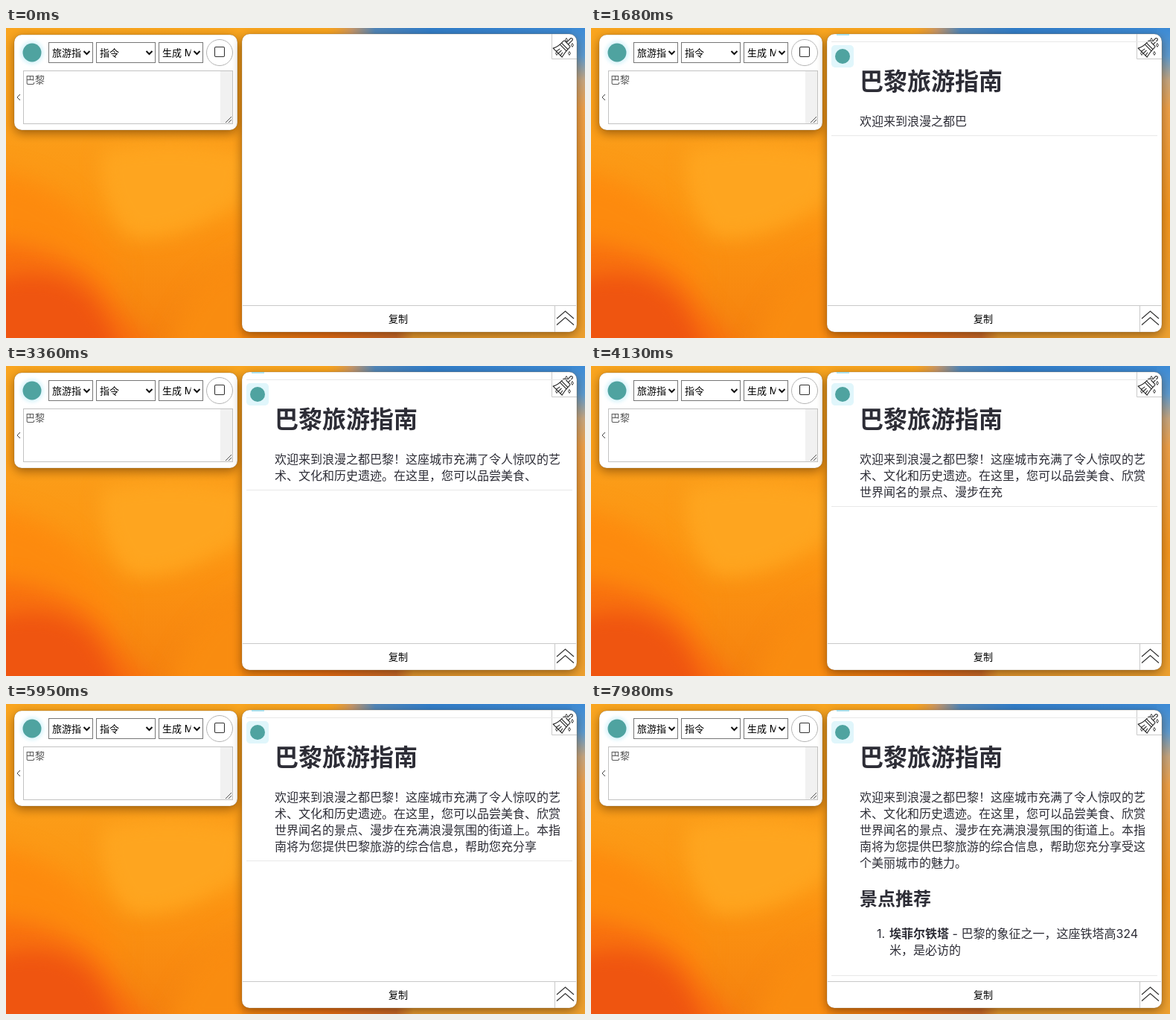
An HTML page with a canvas for the animation above (8 s loop, 778 by 416 pixels).

```html
<!DOCTYPE html>
<html lang="zh-CN">
<head>
<meta charset="utf-8">
<title>旅游指南</title>
<style>
  html, body { margin: 0; width: 778px; height: 416px; overflow: hidden; }
  canvas, svg { position: absolute; left: 0; top: 0; display: block; }
  text { font-family: Inter, "Noto Sans CJK SC", "Noto Sans CJK", sans-serif; font-size: 16px; fill: #2d2d36; white-space: pre; }
  .ui { font-size: 13px; fill: #000; }
  .h1 { font-size: 32px; font-weight: 700; }
  .h2 { font-size: 24px; font-weight: 700; }
  .b { font-weight: 700; }
</style>
</head>
<body>
<canvas id="stage" width="778" height="416"></canvas>
<svg width="778" height="416" viewBox="0 0 778 416">
  <defs>
    <clipPath id="c1"><rect x="58" y="20" width="43" height="26"/></clipPath>
    <clipPath id="c2"><rect x="206" y="20" width="42.5" height="26"/></clipPath>
  </defs>
  <text class="ui" x="62" y="38" clip-path="url(#c1)">旅游指令</text>
  <text class="ui" x="126" y="38">指令</text>
  <text class="ui" x="210" y="38" clip-path="url(#c2)">生成 MD</text>
  <text class="ui" x="26" y="74" style="fill:#555">巴黎</text>
  <text class="ui" x="514" y="395">复制</text>
  <g id="reply">
    <rect x="330" y="8" width="17" height="2" fill="#a9e0ee"/>
    <rect x="323" y="18" width="438" height="1" fill="#e8e8e8"/>
    <rect x="323" y="23" width="30" height="30" rx="5" fill="#e0f6fb"/>
    <circle cx="338" cy="38" r="10" fill="#4fa3a0"/>
    <rect id="rule" x="323" width="438" height="1" fill="#e8e8e8"/>
    <text id="title" class="h1" x="361" y="83"></text>
    <g id="para"></g>
    <text id="sub" class="h2" x="361" y="270"></text>
    <text id="mark" x="384" y="314"></text>
    <text x="401" y="314"><tspan id="name" class="b"></tspan><tspan id="item1"></tspan></text>
    <text id="item2" x="401" y="336"></text>
  </g>
</svg>
<script>
const $ = id => document.getElementById(id);
const ctx = $('stage').getContext('2d');

// ---- static scene ----
function linear(x0, y0, x1, y1, stops) {
  const g = ctx.createLinearGradient(x0, y0, x1, y1);
  stops.forEach(([p, c]) => g.addColorStop(p, c));
  return g;
}

function softShape(d, color, blur) {
  ctx.save();
  ctx.filter = `blur(${blur}px)`;
  ctx.fillStyle = color;
  ctx.fill(new Path2D(d));
  ctx.restore();
}

function stroke(d, color = '#333', width = 1) {
  ctx.strokeStyle = color;
  ctx.lineWidth = width;
  ctx.stroke(new Path2D(d));
}

function box(x, y, w, h, color, fill) {
  if (fill) { ctx.fillStyle = fill; ctx.fillRect(x, y, w, h); }
  ctx.strokeStyle = color;
  ctx.lineWidth = 1;
  ctx.strokeRect(x + .5, y + .5, w - 1, h - 1);
}

function disc(x, y, r, color) {
  ctx.fillStyle = color;
  ctx.beginPath();
  ctx.arc(x, y, r, 0, 7);
  ctx.fill();
}

function panel(x, y, w, h) {
  ctx.save();
  ctx.shadowColor = 'rgba(60,30,0,.5)';
  ctx.shadowBlur = 14;
  ctx.shadowOffsetY = 4;
  ctx.fillStyle = '#fff';
  ctx.beginPath();
  ctx.roundRect(x, y, w, h, 10);
  ctx.fill();
  ctx.shadowColor = 'transparent';
  ctx.strokeStyle = 'rgba(90,60,20,.35)';
  ctx.lineWidth = .6;
  ctx.stroke();
  ctx.restore();
}

function wallpaper() {
  ctx.fillStyle = linear(0, 0, 0, 416, [[0, '#f9a51f'], [.35, '#fb9c18'], [.6, '#fd9612'], [1, '#f5820f']]);
  ctx.fillRect(0, 0, 778, 416);
  softShape('M-30 190C50 200 110 240 150 320L130 450H-30Z', '#fd8a0e', 16);
  softShape('M-30 285C30 290 90 300 135 350C160 390 190 420 220 450H-30Z', '#f8700f', 14);
  softShape('M-30 345C30 320 90 330 120 370C140 400 150 420 160 450H-30Z', '#ef5510', 13);
  softShape('M128 165C190 150 260 150 330 170L315 235C270 260 220 290 165 280C135 250 125 210 128 165Z', '#fea51f', 12);
  softShape('M215 440C235 370 270 320 330 300V440Z', '#f98c10', 14);
  ctx.fillStyle = linear(430, 0, 778, 0, [[0, 'rgba(240,155,50,0)'], [.1, '#c3966b'], [.19, '#4f86ba'], [.4, '#2f7dcb'], [1, '#3b8ad6']]);
  ctx.fillRect(430, 0, 348, 14);
  ctx.fillStyle = linear(0, 0, 0, 416, [[0, '#3b8ad6'], [.09, '#5b9bd2'], [.17, '#c7a781'], [.26, '#eda04a'], [.6, '#f2951f'], [1, '#eda02f']]);
  ctx.fillRect(760, 0, 18, 416);
  ctx.fillStyle = linear(317, 0, 778, 0, [[0, '#f5870f'], [.25, '#ec6e14'], [.45, '#c9682a'], [.5, '#e59a30'], [1, '#eda02f']]);
  ctx.fillRect(317, 402, 461, 14);
}

function inputPanel() {
  panel(11, 9, 300, 128);
  ctx.save();
  ctx.filter = 'blur(2px)';
  disc(35, 33, 16, '#def5fb');
  ctx.restore();
  disc(35, 33, 12.5, '#4fa3a0');
  [[57, 60], [121, 80], [205, 60]].forEach(([x, w]) => {
    box(x, 19, w, 28, '#767676', '#fff');
    const m = x + w - 8.5;
    stroke(`M${m - 4} 31l4 4l4 -4`, '#111', 2);
  });
  ctx.strokeStyle = '#b5b5b5';
  ctx.lineWidth = 1;
  ctx.beginPath();
  ctx.arc(287, 33, 17.5, 0, 7);
  ctx.stroke();
  ctx.strokeStyle = '#333';
  ctx.lineWidth = 1.1;
  ctx.beginPath();
  ctx.roundRect(280.5, 25.5, 13, 13, 1.5);
  ctx.stroke();
  box(23, 57, 282, 72, '#c3c3c3', '#fff');
  ctx.fillStyle = '#f1f1f1';
  ctx.fillRect(288, 58, 16, 70);
  stroke('M295 127L303 119M299 127L303 123', '#555');
  stroke('M19 89L15 93L19 97', '#444');
}

function broom() {
  ctx.save();
  ctx.translate(750, 25);
  ctx.rotate(Math.PI / 4);
  ctx.lineJoin = 'round';
  stroke('M-1.7 -6V-14Q0 -17 1.7 -14V-6M-5 -6H5Q6 -6 6 -4V-1H-6V-4Q-6 -6 -5 -6Z', '#222', 1.1);
  stroke('M-6 -1C-6 5 -7 9 -9 12H8C7 8 6 5 6 -1M-6 2H6M-3 12L-2 6M1 12V6M5 12L4 7', '#222', 1.1);
  ctx.restore();
  [[753, 16], [761, 23], [740, 34], [757, 34]].forEach(([x, y]) =>
    stroke(`M${x} ${y - 2.5}l1.5 2.5l-1.5 2.5l-1.5 -2.5z`, '#333', .9));
}

function replyPanel() {
  panel(317, 8, 450, 400);
  stroke('M733.5 8V41.5H767M318 372.5H766M737.5 373V408', '#c9c9c9');
  broom();
  stroke('M740 390L751.5 380L763 390M740 398.5L751.5 388.5L763 398.5', '#333', 1.2);
}

wallpaper();
inputPanel();
replyPanel();

// ---- typed reply ----
const TITLE = '巴黎旅游指南';
const PARA = '欢迎来到浪漫之都巴黎！这座城市充满了令人惊叹的艺' +
  '术、文化和历史遗迹。在这里，您可以品尝美食、欣赏' +
  '世界闻名的景点、漫步在充满浪漫氛围的街道上。本指' +
  '南将为您提供巴黎旅游的综合信息，帮助您充分享受这个美丽城市的魅力。';
const SUB = '景点推荐';
const NAME = '埃菲尔铁塔';
const ITEM1 = ' - 巴黎的象征之一，这座铁塔高324'.match(/ - |\d+|./g);
const ITEM2 = '米，是必访的';
const PER_LINE = 24, LOOP = 8000, REPLY_AT = 560;

// [time in ms, tokens typed]
const PACE = [[0, 0], [839, 0], [840, 1], [980, 1.3], [2380, 29.3], [3360, 52.3],
  [4830, 80.3], [5950, 100.3], [7980, 142.5], [8000, 142.9]];

const lines = [0, 1, 2, 3, 4].map(i => {
  const el = document.createElementNS($('para').namespaceURI, 'text');
  el.setAttribute('x', 361);
  el.setAttribute('y', 131 + 22 * i);
  $('para').append(el);
  return el;
});

function typedAt(t) {
  const i = PACE.findIndex(k => k[0] > t);
  const [t0, n0] = PACE[i - 1], [t1, n1] = PACE[i];
  return Math.floor(n0 + (n1 - n0) * (t - t0) / (t1 - t0));
}

function render(t) {
  let left = typedAt(t);
  const take = list => {
    const n = Math.min(left, list.length);
    left -= n;
    return list.slice(0, n);
  };
  const title = take(TITLE), para = take(PARA), sub = take(SUB), mark = take(['1.']);
  const name = take(NAME), item1 = take(ITEM1), item2 = take(ITEM2);

  $('title').textContent = title;
  lines.forEach((el, i) => el.textContent = para.slice(i * PER_LINE, (i + 1) * PER_LINE));
  $('sub').textContent = sub;
  $('mark').textContent = mark.join('');
  $('name').textContent = name;
  $('item1').textContent = item1.join('');
  $('item2').textContent = item2;

  const ruleY = item2 ? 364 : name ? 342 : mark.length ? 338 : sub ? 305
    : para ? 122 + 22 * Math.ceil(para.length / PER_LINE) : title ? 122 : 58;
  $('rule').setAttribute('y', ruleY);
  $('reply').style.display = t < REPLY_AT ? 'none' : '';
}

const start = performance.now();
function tick() {
  render((performance.now() - start) % LOOP);
  requestAnimationFrame(tick);
}
tick();
</script>
</body>
</html>
```
